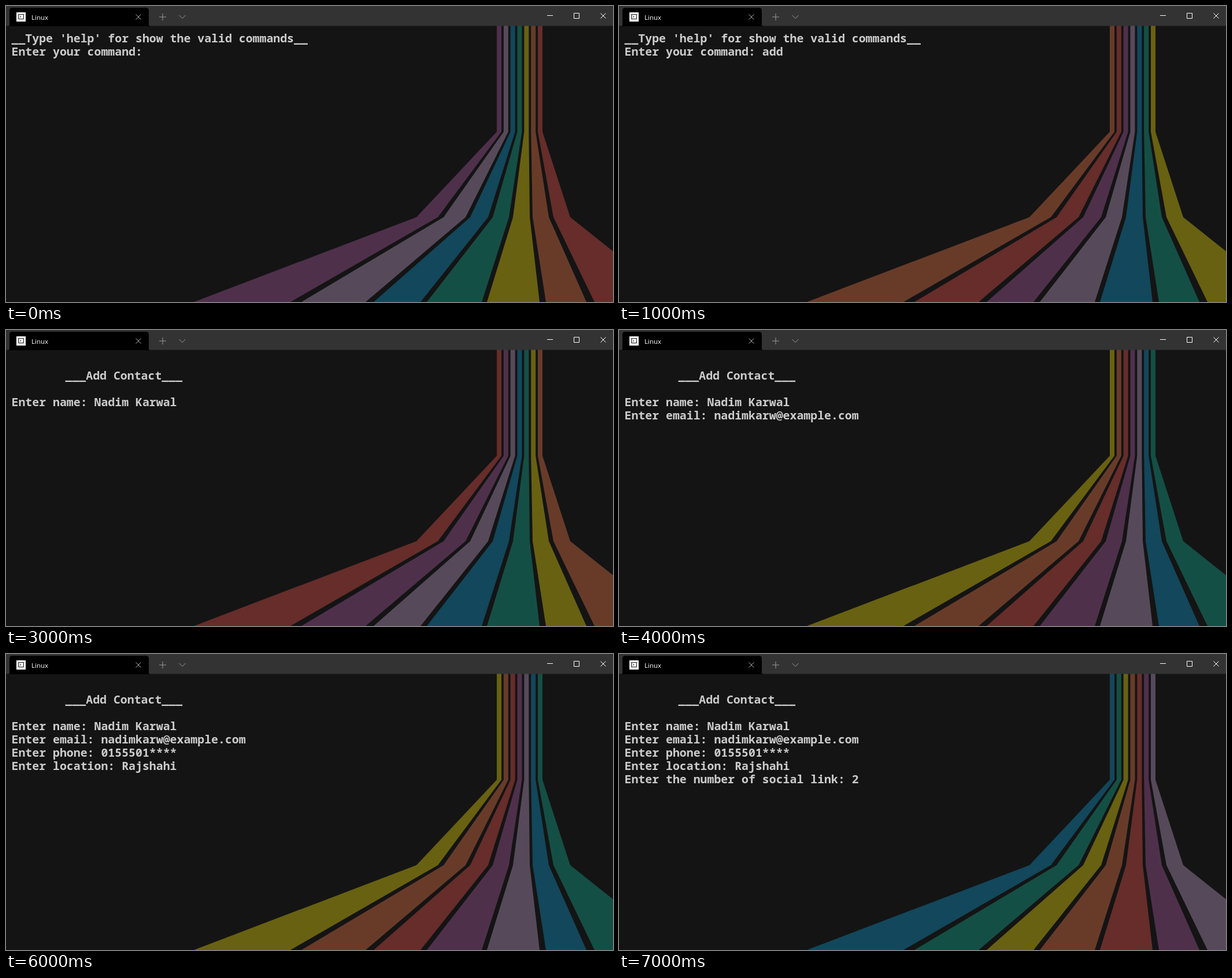
An HTML page that plays this animation: 1050x513 px, repeating every 8000 ms.

```html
<!DOCTYPE html>
<html lang="en">
<head>
<meta charset="utf-8">
<title>Terminal</title>
<style>
  html, body { margin: 0; width: 100%; height: 100%; overflow: hidden; background: #141414; }
  svg { display: block; }
  .line { font: 600 19.87px "Noto Sans Mono", monospace; fill: #ccc; white-space: pre; }
  .tab { font: 11.5px "Open Sans", sans-serif; fill: #fff; }
  .icon { fill: none; stroke: #fff; }
</style>
</head>
<body>
<svg width="1050" height="513" viewBox="0 0 1050 513">
  <g id="stripes"></g>
  <path d="M0 0H1050V34.5H0Z" fill="#333"/>
  <path d="M4 35Q6 35 6 32V8Q6 3 11 3H242Q247 3 247 8V32Q247 35 249 35Z"/>
  <path d="M18 11H34V27H18Z" fill="#fff"/>
  <path class="icon" style="stroke:#111" d="M21.5 14.5H30.5V22.5H21.5ZM23.5 16.5L25.5 18.5L23.5 20.5"/>
  <text class="tab" x="44" y="24">Linux</text>
  <path class="icon" style="stroke:#aaa" d="M224.5 14.5L233.5 23.5M233.5 14.5L224.5 23.5"/>
  <path class="icon" style="stroke:#999" d="M265 19H277M271 13V25M299.5 16L305 21.5L310.5 16"/>
  <path class="icon" d="M936 16.5H946M982.5 12.5H991.5V21.5H982.5ZM1028.5 12.5L1037.5 21.5M1037.5 12.5L1028.5 21.5"/>
  <g id="screen"></g>
</svg>
<script>
const COLORS = ['#4f304b', '#564a5a', '#12475c', '#144f45', '#686111', '#683b29', '#662d2a'];
const SHIFTS = [0, 5, 1, 6, 4, 0, 4, 2]; // first stripe colour of each step
const STEP = 1000;

// Left and right edge of each stripe at the lower bend and at the bottom
const BEND = [[710, 747], [757, 795], [803, 834], [842, 870], [877, 906], [911, 939], [947, 976]];
const BASE = [[325, 492], [511, 622], [636, 717], [728, 823], [832, 923], [934, 1004], [1018, 1160]];

const INTRO = "__Type 'help' for show the valid commands__";
const FORM = [
  'Enter name: Nadim Karwal',
  'Enter email: nadimkarw@example.com',
  'Enter phone: 0155501****',
  'Enter location: Rajshahi',
  'Enter the number of social link: 2'
];

const stripes = document.getElementById('stripes');
const screen = document.getElementById('screen');

function add(parent, tag, attrs, text = '') {
  const el = document.createElementNS('http://www.w3.org/2000/svg', tag);
  for (const name in attrs) el.setAttribute(name, attrs[name]);
  el.textContent = text;
  return parent.appendChild(el);
}

const bands = BEND.map(([bl, br], i) => {
  const l = 849 + i * 11.83, r = l + 8;
  const [dl, dr] = BASE[i];
  return add(stripes, 'path', { d: `M${l} 34V218L${bl} 366L${dl} 513H${dr}L${br} 366L${r} 218V34Z` });
});

function print(row, text, x = 9.5) {
  add(screen, 'text', { class: 'line', x, y: 63 + 23 * row }, text);
}

function show(step) {
  bands.forEach((band, i) => band.setAttribute('fill', COLORS[(i + SHIFTS[step]) % 7]));
  screen.replaceChildren();
  if (step < 2) {
    print(0, INTRO);
    print(1, 'Enter your command:' + (step ? ' add' : ''));
    return;
  }
  print(1, '___Add Contact___', 102.5);
  if (step === 2) print(3, 'Enter name:');
  else FORM.slice(0, step - 2).forEach((text, i) => print(3 + i, text));
}

let current = -1;
function tick() {
  const step = Math.floor(performance.now() / STEP) % SHIFTS.length;
  if (step !== current) show(current = step);
  requestAnimationFrame(tick);
}
tick();
</script>
</body>
</html>
```
